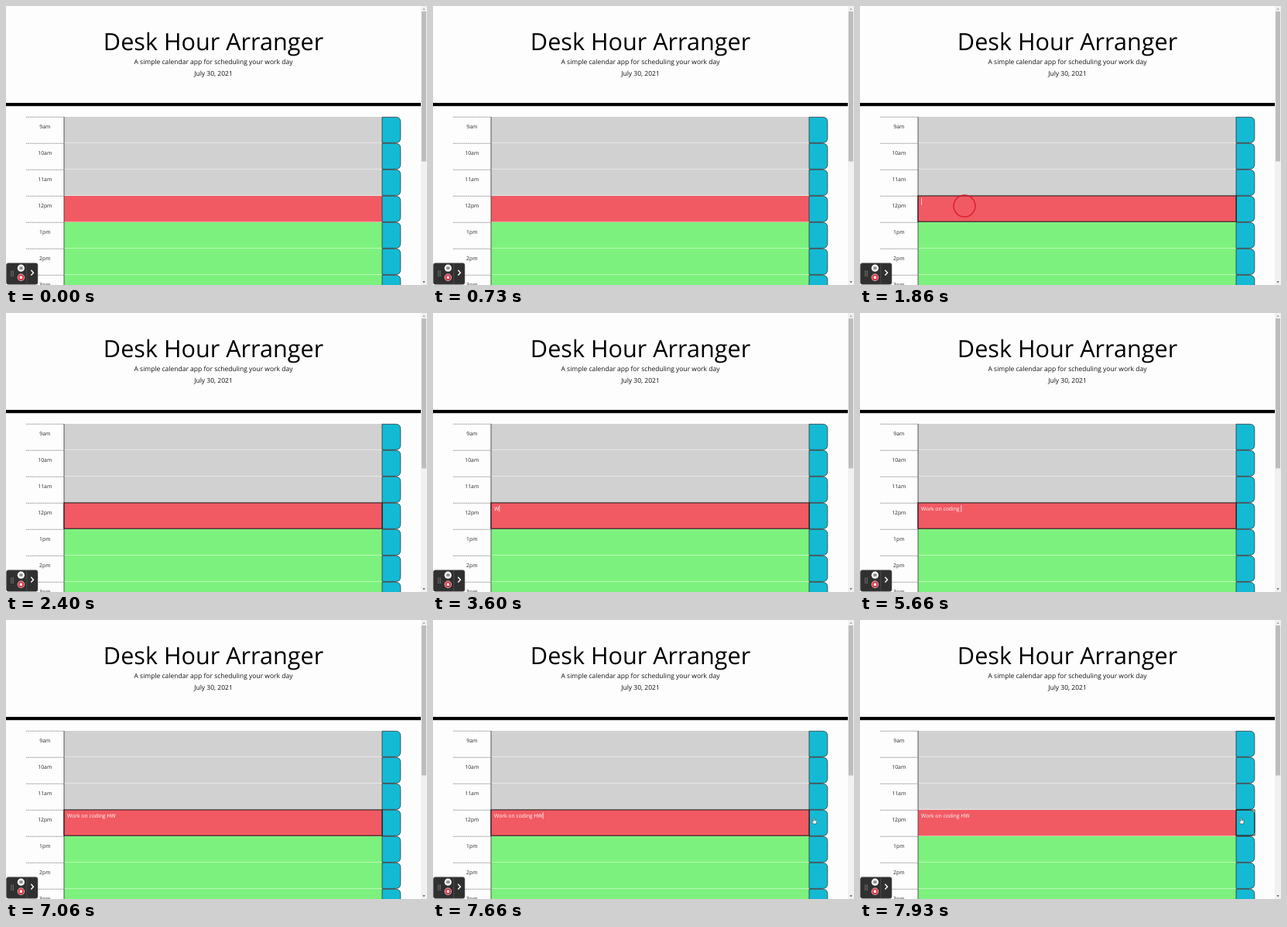
An HTML page for the animation above (8000 ms loop, 544x360 px).

```html
<!DOCTYPE html>
<html lang="en">
<head>
<meta charset="utf-8">
<title>Day planner</title>
<style>
  html, body { margin: 0; width: 100%; height: 100%; overflow: hidden; background: #fdfdfd; }
  svg { display: block; width: 544px; height: 360px; }
  text { font-family: "Open Sans", sans-serif; fill: #212529; text-rendering: geometricPrecision; white-space: pre; }
  .mid { text-anchor: middle; }
</style>
</head>
<body>
<svg viewBox="0 0 544 360">
  <rect width="544" height="360" fill="#fdfdfd"/>
  <text class="mid" x="268" y="57" font-size="30.6" style="fill:#000">Desk Hour Arranger</text>
  <text class="mid" x="268" y="74.6" font-size="8.5" style="fill:#111">A simple calendar app for scheduling your work day</text>
  <text class="mid" x="268" y="89.7" font-size="8.5" style="fill:#111">July 30, 2021</text>
  <rect y="125" width="536" height="4.2"/>

  <g id="rows"></g>

  <rect id="focus" x="74.9" y="244.9" width="411.3" height="33.3" fill="none" stroke="#101010" stroke-width="1"/>
  <text id="note" x="79" y="254.6" font-size="6.8" style="fill:#fff"></text>
  <rect id="caret" y="248" width=".7" height="8.8" fill="#fff"/>
  <circle id="ring" cx="135" cy="258" r="14" fill="none" stroke="#d91c2c" stroke-width="1.4"/>

  <rect id="saveFocus" x="486" y="245" width="24" height="33" fill="none" stroke="#101010" stroke-width=".9"/>
  <path id="hand" d="M-.7 .6Q0-.5 .7 .6V3.2L3.2 3.8Q4 4 3.8 5L3.2 8H-.6L-2.6 5.2Q-2.6 4-.7 5Z" fill="#fff" stroke="#222" stroke-width=".5"/>

  <!-- scrollbar -->
  <rect x="536" width="8" height="360" fill="#f1f1f1"/>
  <rect x="537" y="7" width="6" height="193.5" fill="#bdbdbd"/>
  <path d="M538.4 4.8L540 2.8L541.6 4.8Z" fill="#999"/>
  <path d="M538.4 355.2L540 357.2L541.6 355.2Z" fill="#444"/>

  <!-- recorder panel -->
  <rect x="0.5" y="331.8" width="40.5" height="27.4" rx="2.5" fill="#303030" stroke="#555" stroke-width=".5"/>
  <path d="M26.8 332V359" stroke="#555" stroke-width=".7"/>
  <g id="grip" fill="#aaa"></g>
  <circle cx="19.4" cy="338.2" r="4.6" fill="#fff"/>
  <path d="M18.3 336.3V340.1M20.5 336.3V340.1" stroke="#333" stroke-width="1.1"/>
  <circle cx="19.4" cy="350.2" r="4.6" fill="#f3dadd"/>
  <circle cx="19.4" cy="350.2" r="3.9" fill="#d93445"/>
  <rect x="17.8" y="348.6" width="3.2" height="3.2" fill="#fff"/>
  <path d="M32.3 340.8L35.5 344.2L32.3 347.6" fill="none" stroke="#fff" stroke-width="1.4"/>
</svg>
<script>
const LOOP = 8000, BLINK = 530, CLICK = 1860, SAVE = 7900;
const NOTE = "Work on coding HW";
const KEYS = [3600, 3730, 3800, 3930, 4000, 4130, 4260, 4400, 4530,
              4630, 4730, 4800, 4930, 5060, 5200, 6000, 6130];
const $ = id => document.getElementById(id);
const show = (el, on) => el.setAttribute("visibility", on ? "visible" : "hidden");

function rowMarkup(label, i) {
  const y = 143 + 34 * i;
  const fill = i < 3 ? "#d1d1d1" : i === 3 ? "#f15a63" : "#7df17d";
  return `<path d="M26 ${y + .3}H75" stroke="#555" stroke-width=".7" stroke-dasharray="1 .7"/>
    <text class="mid" x="50.3" y="${y + 14.7}" font-size="6.8">${label}</text>
    <rect x="75" y="${y}" width="411" height="34" fill="${fill}"/>
    <path d="M75 ${y + 33.8}H486" stroke="#fff" stroke-width=".8" stroke-opacity=".8"/>
    <path d="M75 ${y}V${y + 34}" stroke="#333" stroke-width=".8"/>
    <path d="M486 ${y + .4}H503.6Q509.8 ${y + .4} 509.8 ${y + 6.6}V${y + 27.2}Q509.8 ${y + 33.4} 503.6 ${y + 33.4}H486Z"
      fill="#14bad4" stroke="#2b3538" stroke-width=".8"/>`;
}

$("rows").innerHTML = ["9am", "10am", "11am", "12pm", "1pm", "2pm", "3pm"].map(rowMarkup).join("");
for (let i = 0; i < 8; i++)
  $("grip").innerHTML += `<rect x="${6.3 + i % 2 * 2.4}" y="${341.7 + (i >> 1) * 2}" width="1.1" height="1"/>`;

function draw(t) {
  const typed = KEYS.filter(k => k <= t).length;
  const since = t - (typed ? KEYS[typed - 1] : CLICK);
  const active = t >= CLICK && t < SAVE;
  const note = $("note");
  note.textContent = NOTE.slice(0, typed);

  show($("focus"), active);
  show($("caret"), active && since % (2 * BLINK) < BLINK);
  $("caret").setAttribute("x", 79.2 + (typed ? note.getComputedTextLength() : 0));

  const fade = (t - CLICK) / 340;
  show($("ring"), fade >= 0 && fade < 1);
  $("ring").setAttribute("opacity", Math.min(1, Math.max(0, 1.2 * (1 - fade))));

  // pointer glides onto the save button
  const p = Math.min(1, Math.max(0, (t - 7460) / 300));
  const ease = 1 - (1 - p) ** 3;
  show($("hand"), p > 0);
  $("hand").setAttribute("transform", `translate(${487 + 5.3 * ease} ${255})`);
  show($("saveFocus"), t >= SAVE);
}

const start = performance.now();
function tick() {
  draw((performance.now() - start) % LOOP);
  requestAnimationFrame(tick);
}
tick();
</script>
</body>
</html>
```
